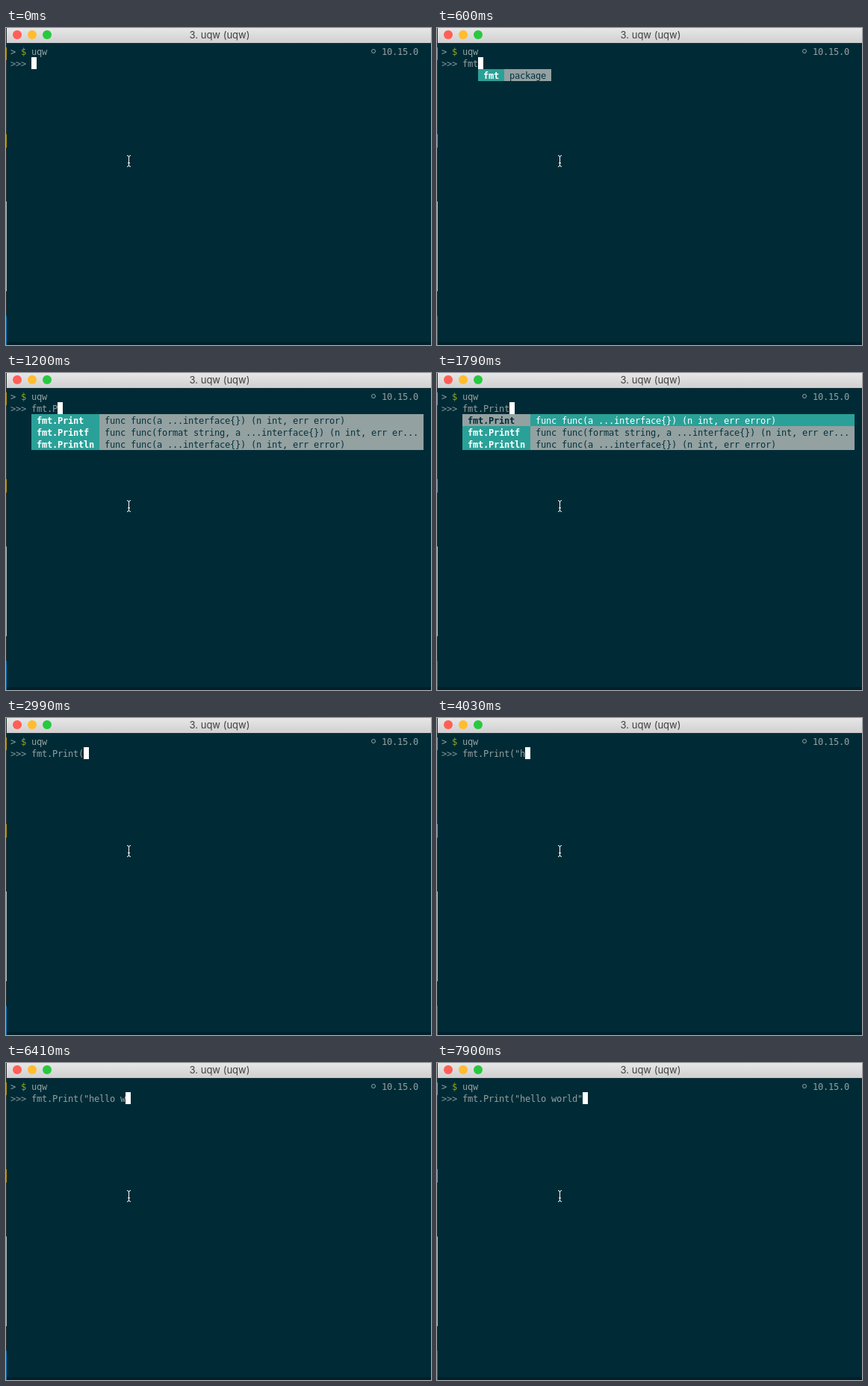
Animation of 569 by 424 pixels, one loop 8 s. Source, as an HTML page:

```html
<!DOCTYPE html>
<html lang="en">
<head>
<meta charset="utf-8">
<title>Terminal</title>
<style>
html, body { margin: 0; width: 100%; height: 100%; overflow: hidden; }
#stage { position: relative; width: 569px; height: 424px; overflow: hidden; background: #002b36; }
#stage div, #stage svg { position: absolute; }
#edge {
  left: 0; top: 0; width: 1px; height: 424px;
  background: linear-gradient(#2b2f31 26px, #b98a0c 0 43px, #33383a 0 142px, #b98a0c 0 160px,
    #2b2f31 0 232px, #b9bdbd 0 352px, #2b2f31 0 385px, #0b74b8 0);
}
#bottom { left: 1px; top: 420px; width: 568px; height: 4px; background: #00202c; }
#bar {
  left: 0; top: 0; width: 569px; height: 20px;
  background: linear-gradient(#e8e7e8, #d1d0d1); border-bottom: 1px solid #1b3039;
}
#title {
  left: 2px; top: 0; width: 568px; text-align: center; color: #404040;
  font: 13px/19px Inter, Roboto, sans-serif;
}
.light { top: 3px; width: 12px; height: 12px; border-radius: 50%; }
.t {
  height: 16px; white-space: pre; color: #93a1a1;
  font: 12px/18px "DejaVu Sans Mono", monospace; letter-spacing: -0.224px;
}
#ring { left: 489px; top: 28px; width: 4px; height: 4px; border: 1.5px solid #93a1a1; border-radius: 50%; }
#caret { top: 39px; width: 7px; height: 16px; background: #fff; }
.name { background: #2aa198; color: #fff; font-weight: bold; }
.desc { background: #93a1a1; color: #06323d; }
.on.name { background: #93a1a1; color: #002b36; }
.on.desc { background: #2aa198; color: #fff; }
#pointer { left: 0; top: 0; fill: none; stroke: #fff; }
</style>
</head>
<body>
<div id="stage">
  <div id="bar"></div>
  <div id="title">3. uqw (uqw)</div>
  <div class="light" style="left:9px;background:#ff5f57"></div>
  <div class="light" style="left:29px;background:#ffbd2e"></div>
  <div class="light" style="left:49px;background:#28c940"></div>
  <div id="bottom"></div>
  <div id="edge"></div>
  <div class="t" style="left:6px;top:23px">&gt; <span style="color:#93a81a">$</span> uqw</div>
  <div id="ring"></div>
  <div class="t" style="left:503px;top:23px">10.15.0</div>
  <div class="t" style="left:6px;top:39px;color:#839496">&gt;&gt;&gt;</div>
  <div class="t" id="input" style="left:34px;top:39px"></div>
  <div id="caret"></div>
  <div id="menu"></div>
  <svg id="pointer" width="569" height="424">
    <path d="M162 170.5Q164.5 170.5 164.5 173V183Q164.5 185.5 162 185.5M167 170.5Q164.5 170.5 164.5 173M167 185.5Q164.5 185.5 164.5 183M163 180.5h3"/>
  </svg>
</div>
<script>
const LOOP = 8000, CELL = 7, LINE = 16, LEFT = 34, TOP = 55;
const $ = id => document.getElementById(id);

const pkg = (...names) => names.map(n => [n, 'package']);
const wr = 'func func(w io.Writer, ', rd = 'func func(r io.Reader, ';
const plain = 'a ...interface{}) (n int, err e...';
const format = 'format string, a ...interface{}...';
const ret = '(n int, err error)';

// nameW and descW are column widths in cells
const one = col => ({ col, nameW: 5, descW: 9, rows: pkg('fmt') });
const all = {
  col: 0, nameW: 16, descW: 59, scroll: true,
  rows: [
    ['fmt.Errorf', 'func func(format string, a ...interface{}) error'],
    ['fmt.Fprint', wr + plain],
    ['fmt.Fprintf', wr + format],
    ['fmt.Fprintln', wr + plain],
    ['fmt.Fscan', rd + plain],
    ['fmt.Fscanf', rd + format]
  ]
};
const print = {
  col: 0, nameW: 13, descW: 62,
  rows: [
    ['fmt.Print', 'func func(a ...interface{}) ' + ret],
    ['fmt.Printf', 'func func(format string, a ...interface{}) (n int, err er...'],
    ['fmt.Println', 'func func(a ...interface{}) ' + ret]
  ]
};
const packages = { col: 17, nameW: 9, descW: 9, rows: pkg('fmt', 'io', 'os', 'strings') };

// time, typed characters, menu
const line = 'fmt.Print("hello world"';
const steps = [
  [0, 0], [450, 2, one(2)], [600, 3, one(3)], [900, 4, all],
  [1200, 5, print], [1640, 6, print], [1790, 9, { ...print, picked: 0 }],
  [2990, 10], [3280, 11], [4030, 12], [5370, 13], [5670, 15], [5970, 16],
  [6270, 17, packages], [6410, 18], [6560, 19], [6710, 20],
  [7300, 21], [7450, 22], [7900, 23]
];

function cell(cls, col, row, width, text) {
  const el = document.createElement('div');
  el.className = 't ' + cls;
  el.style.cssText = `left:${LEFT + col * CELL}px;top:${TOP + row * LINE}px;width:${width * CELL}px`;
  el.textContent = text;
  $('menu').append(el);
}

function drawMenu(menu) {
  $('menu').replaceChildren();
  if (!menu) return;
  const { col, nameW, descW, rows, picked, scroll } = menu;
  rows.forEach(([name, desc], i) => {
    const on = i === picked ? 'on ' : '';
    cell(on + 'name', col, i, nameW, ' ' + name);
    cell(on + 'desc', col + nameW, i, descW, ' ' + desc);
    if (scroll && i > 1) cell('name', col + nameW + descW, i, 1, '');
  });
}

let shown;
function draw(now) {
  const t = now % LOOP;
  const step = steps.findLast(s => s[0] <= t);
  if (step !== shown) {
    shown = step;
    const [, count, menu] = step;
    $('input').textContent = line.slice(0, count);
    $('caret').style.left = LEFT + count * CELL + 'px';
    drawMenu(menu);
  }
  $('pointer').style.visibility = t >= 1500 && t < 1640 ? 'hidden' : 'visible';
}

const start = performance.now();
function tick() {
  draw(performance.now() - start);
  requestAnimationFrame(tick);
}
tick();
</script>
</body>
</html>
```
